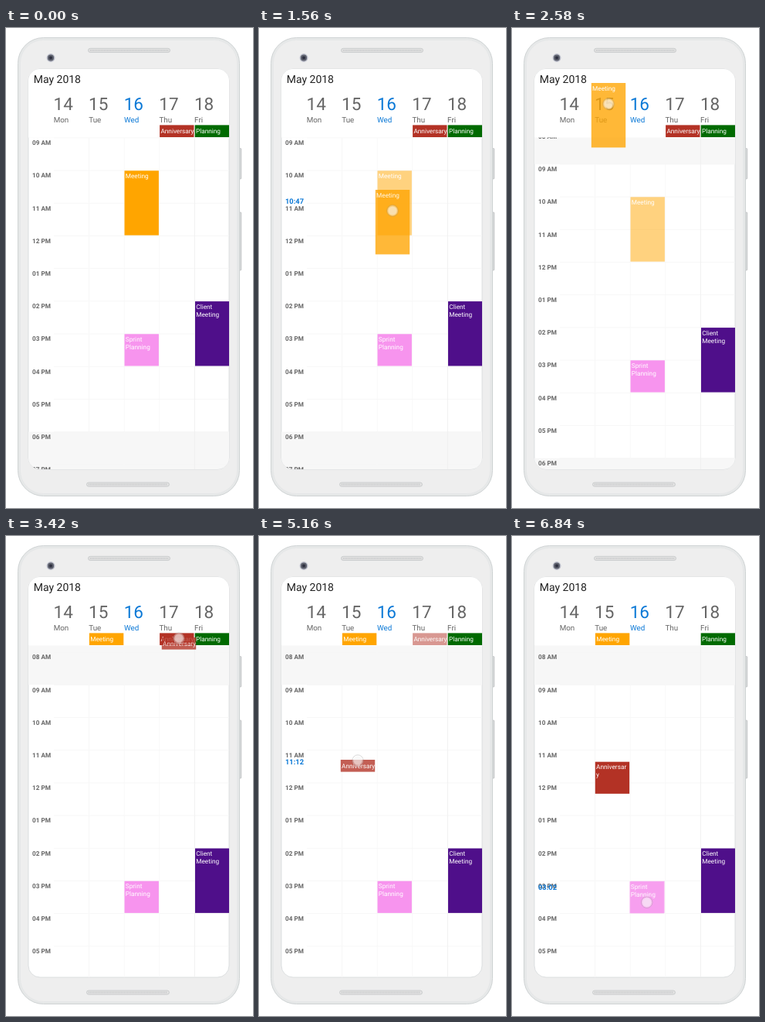
An HTML page for the animation above (6.9 s loop, 320x620 px).

```html
<!DOCTYPE html>
<html lang="en">
<head>
<meta charset="utf-8">
<title>Calendar drag and drop</title>
<style>
  html, body { margin: 0; width: 100%; height: 100%; overflow: hidden; background: #fff; }
  svg { display: block; width: 320px; height: 620px; }
  text { font-family: Roboto, "Open Sans", sans-serif; text-rendering: geometricPrecision; white-space: pre; }
  .hour { font-size: 8.2px; font-weight: 700; fill: #666; }
  .time { font-size: 9.3px; font-weight: 700; fill: #0a78d6; }
  .event { font-size: 8.25px; fill: #fff; }
  .date { font-size: 22.5px; fill: #666; }
  .day { font-size: 9.8px; fill: #666; }
  .today { fill: #0a78d6; }
</style>
</head>
<body>
<svg viewBox="0 0 320 620" xmlns="http://www.w3.org/2000/svg">
  <defs>
    <clipPath id="screen"><rect x="29" y="53" width="260" height="517" rx="15"/></clipPath>
    <clipPath id="hours"><rect x="29" y="141.3" width="260" height="429"/></clipPath>
  </defs>
  <g id="phone">
    <g fill="#d6d8d9" stroke="#b8bbbc" stroke-width=".7">
      <rect x="301" y="155.5" width="3.8" height="39.5" rx="1"/>
      <rect x="301" y="238" width="3.8" height="75" rx="1"/>
    </g>
    <rect x="15.5" y="12.5" width="287" height="592" rx="33" fill="#e6e8e8" stroke="#cfd3d4"/>
    <rect x="18.5" y="15.5" width="281" height="586" rx="30" fill="#eee" stroke="#e2e5e6" stroke-width=".6"/>
    <g fill="#e0e0e0" stroke="#c6c8c9" stroke-width=".8">
      <rect x="106.5" y="26.3" width="106" height="5.2" rx="2.6"/>
      <rect x="104.5" y="587" width="107" height="5.2" rx="2.6"/>
    </g>
    <path d="M109 28.9H210M107 589.6H209" stroke="#c8cacb" stroke-width="2" stroke-dasharray="1 1"/>
    <circle cx="58" cy="38.5" r="5.4" fill="#b9bcc8"/>
    <circle cx="58" cy="38.5" r="4" fill="#5c5f6b"/>
    <circle cx="58" cy="38.5" r="2" fill="#2e3040"/>
    <rect x="29" y="53" width="260" height="517" rx="15" fill="#fff" stroke="#d5d9da" stroke-width=".8"/>
  </g>
  <g clip-path="url(#screen)">
    <g id="grid" clip-path="url(#hours)"></g>
    <g id="header"></g>
    <g id="overlay"></g>
  </g>
</svg>
<script>
const LOOP = 6900, HOUR = 42.2, NINE = 141.8, COL = 45.6, LEFT = 62.3, WIDTH = 44.4;
const LABEL_LAG = 110, GHOST = .5, DRAGGED = .78;
const ORANGE = '#ffa500', RED = '#b33225', GREEN = '#006a00', PURPLE = '#4f0f8a', PINK = '#f794ee';
const $ = id => document.getElementById(id);

// The picture advances in bursts: start time -> number of steps
const bursts = { 0: 1, 150: 3, 840: 1, 990: 6, 1560: 3, 1830: 3, 2100: 4, 2460: 3, 2730: 6, 3300: 3, 3570: 6,
  4140: 3, 4410: 3, 4680: 4, 5040: 3, 5310: 6, 5880: 3, 6150: 3, 6420: 6 };
const offsets = [0, 60, 120, 210, 360, 420];
const steps = Object.entries(bursts).flatMap(([start, n]) => offsets.slice(0, n).map(o => +start + o));

// Finger position: time, x, y
const path = [
  [840, 179, 250], [990, 179, 250], [1200, 178, 249], [1450, 175.5, 244.4], [1560, 173, 236],
  [1680, 166, 209], [1830, 156, 180], [2100, 135, 122], [2220, 128, 97], [2310, 126, 92], [2520, 125, 98],
  [3090, 125, 98], [3299, 125, 98], [3300, 224, 132], [3420, 224, 132], [3570, 223, 133], [3990, 220, 136],
  [4140, 196, 160], [4260, 169, 190], [4420, 140, 224.4], [4530, 128.3, 246], [4680, 128, 262],
  [4890, 128, 282], [5160, 128, 290], [5730, 131.5, 292], [6149, 132.5, 292],
  [6150, 175, 473], [6480, 175, 473], [6730, 175, 474.1], [6840, 174.7, 473.2]
];
const scrollPath = [[2100, 0], [2580, 34], [2811, 50.4]];
const drags = [
  { from: 990, to: 2940, dim: 990, color: ORANGE, lines: ['Meeting'], span: 2, grip: 27 },
  { from: 3420, to: 5880, dim: 3570, color: RED, lines: ['Anniversary'], span: 0, grip: 1 },
  { from: 6480, to: LOOP, dim: 6480, color: PINK, lines: ['Sprint', 'Planning'], span: 1, grip: 27 }
];

function sample(keys, t) {
  const i = keys.findIndex(k => k[0] > t);
  if (i === 0) return keys[0].slice(1);
  if (i < 0) return keys[keys.length - 1].slice(1);
  const a = keys[i - 1], b = keys[i], p = (t - a[0]) / (b[0] - a[0]);
  return a.slice(1).map((v, j) => v + (b[j + 1] - v) * p);
}

const pad = n => String(n).padStart(2, '0');
const text = (x, y, s, cls) => `<text x="${x}" y="${y}" class="${cls}">${s}</text>`;
const rect = (x, y, w, h, fill) => `<rect x="${x}" y="${y}" width="${w}" height="${h}" fill="${fill}"/>`;
const colX = c => LEFT + COL * c;

// A span of 0 hours is an all-day bar
function block(x, y, span, color, lines, opacity = 1) {
  const h = span ? span * HOUR - 1 : 15.6;
  const first = y + (span ? 9.7 : 11);
  return `<g opacity="${opacity}">` + rect(x, y, WIDTH, h, color) +
    lines.map((s, i) => text(x + 1.3, first + i * 10, s, 'event')).join('') + '</g>';
}

function drawGrid(t, scroll) {
  const hourY = h => NINE + scroll + (h - 9) * HOUR;
  const at = (col, h, ...rest) => block(colX(col) - .3 + .15 * col, hourY(h) + .3, ...rest);
  let out = rect(29, hourY(9) - 300, 260, 300, '#f7f7f7') + rect(29, hourY(18), 260, 200, '#f7f7f7');
  for (let h = 7; h < 20; h++) {
    out += rect(62, hourY(h) - .3, 227, .8, '#f5f5f5');
    out += text(34, hourY(h) + 9.3, `${pad((h + 11) % 12 + 1)} ${h < 12 ? 'AM' : 'PM'}`, 'hour');
  }
  for (let c = 1; c < 5; c++) out += rect(colX(c) - .8, 141, .9, 430, c === 4 ? '#efefef' : '#f7f7f7');
  const [meeting, anniversary, sprint] = drags;
  if (t < meeting.to) out += at(2, 10, 2, ORANGE, ['Meeting'], t >= meeting.dim ? GHOST : 1);
  out += at(4, 14, 2, PURPLE, ['Client', 'Meeting']);
  out += at(2, 15, 1, PINK, ['Sprint', 'Planning'], t >= sprint.dim ? GHOST : 1);
  if (t >= anniversary.to) out += at(1, 11.35, 1, RED, ['Anniversar', 'y']);
  return out;
}

function drawHeader(t) {
  const y = 125.4, [meeting, anniversary] = drags;
  let out = rect(29, 53, 260, 88.3, '#fff') +
    `<text x="35.7" y="71.3" font-size="14" fill="#222">May 2018</text>`;
  ['Mon', 'Tue', 'Wed', 'Thu', 'Fri'].forEach((name, c) => {
    const today = c === 2 ? ' today' : '';
    out += text(colX(c) - .8, 106.2, 14 + c, 'date' + today) + text(colX(c) - .6, 122, name, 'day' + today);
  });
  if (t >= meeting.to) out += block(colX(1), y, 0, ORANGE, ['Meeting']);
  if (t < anniversary.to) out += block(colX(3), y, 0, RED, ['Anniversary'], t >= anniversary.dim ? GHOST : 1);
  return out + block(colX(4), y, 0, GREEN, ['Planning']);
}

function drawOverlay(t, scroll) {
  const [x, y] = sample(path, t);
  const drag = drags.find(d => t >= d.from && t < d.to);
  let out = '';
  if (drag) {
    const line = sample(path, Math.max(t - LABEL_LAG, drag.from))[1] - drag.grip;
    if (line > 141) {
      const minutes = Math.floor((9 + (line - NINE - scroll) / HOUR) * 60);
      const hour = (Math.floor(minutes / 60) + 11) % 12 + 1;
      out += text(34, line + 9.6, `${pad(hour)}:${pad(minutes % 60)}`, 'time');
    }
    out += block(x - 22.2, y - drag.grip, drag.span, drag.color, drag.lines, DRAGGED);
  }
  const touching = t >= 840 && t < 3090 || t >= 3300 && t < 6150 || t >= 6210;
  if (touching) {
    const fade = t >= 5880 && t < 6150 ? .5 : 1;
    out += `<g opacity="${fade}"><circle cx="${x}" cy="${y}" r="7.2" fill="#fff" fill-opacity=".35"
      stroke="#777" stroke-opacity=".3" stroke-width=".9"/>
      <circle cx="${x}" cy="${y}" r="5.6" fill="#f4f4f4" fill-opacity=".5"/></g>`;
  }
  return out;
}

let shown = -1;
function frame(now) {
  const t = now % LOOP;
  const step = steps.filter(s => s <= t).pop();
  if (step !== shown) {
    shown = step;
    const [scroll] = sample(scrollPath, step);
    $('grid').innerHTML = drawGrid(step, scroll);
    $('header').innerHTML = drawHeader(step);
    $('overlay').innerHTML = drawOverlay(step, scroll);
  }
  requestAnimationFrame(frame);
}
const begin = performance.now();
const tick = () => Math.max(0, performance.now() - begin);
frame(tick());
</script>
</body>
</html>
```
